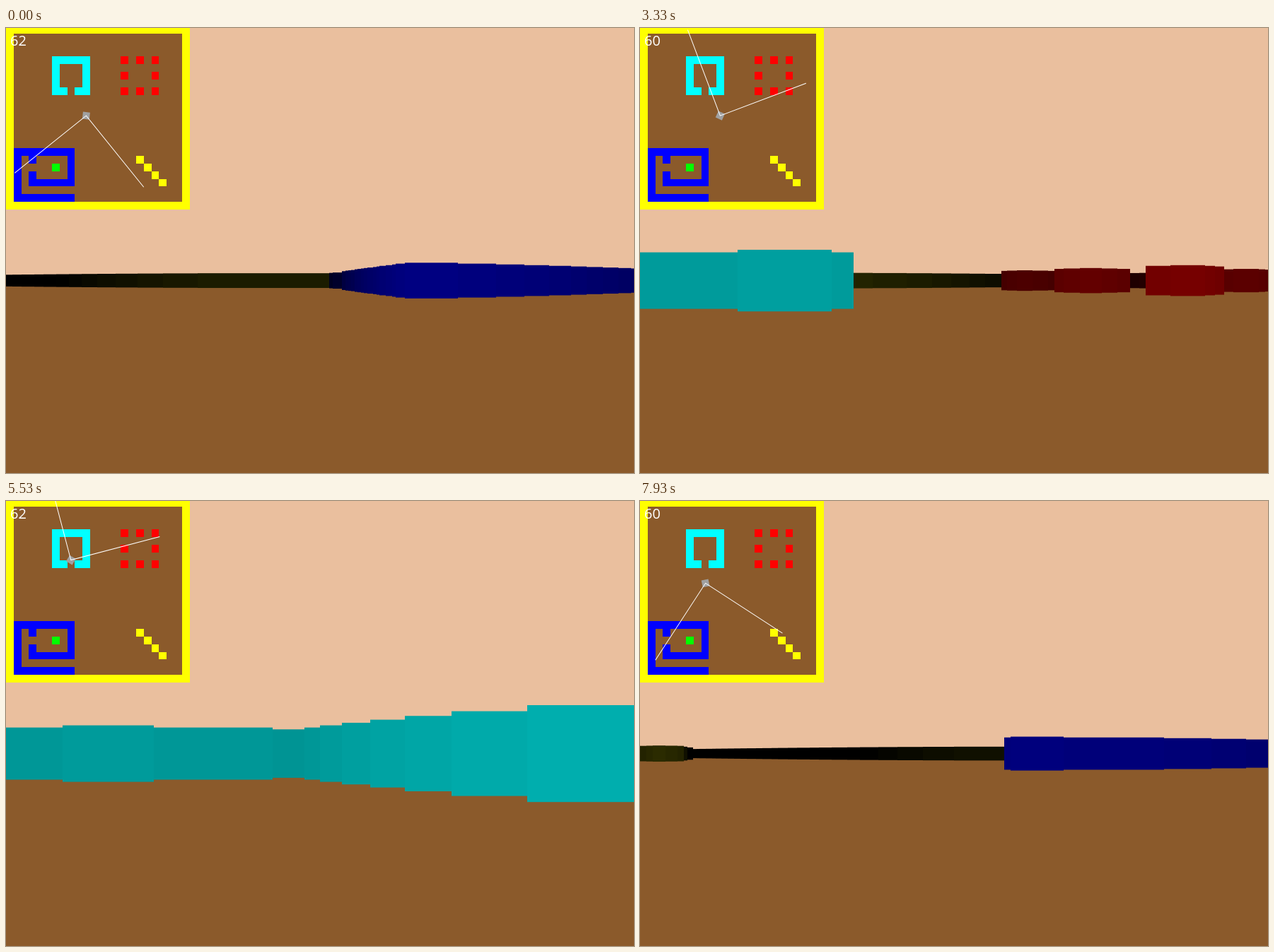
Write an HTML page with a canvas that moves like this. It is 888x630 px and loops after 8 s.

```html
<!DOCTYPE html>
<html lang="en">
<head>
<meta charset="utf-8">
<title>Raycaster</title>
<style>
  html, body { margin: 0; width: 100%; height: 100%; overflow: hidden; background: #8b5a2b; }
  canvas { display: block; }
</style>
</head>
<body>
<canvas id="view" width="888" height="630"></canvas>
<script>
const ctx = document.getElementById('view').getContext('2d');
const W = 888, H = 630, HORIZON = 357.6;
const SKY = '#eabf9e', FLOOR = '#8b5a2b';
const LOOP_MS = 8000, TICKS = 120, TICK_MS = LOOP_MS / TICKS;
const COLUMNS = 200, FOV = 90, STEP = 0.25;
const SIZE = 24, CELL = 10.82, MAP_TOP = -2.8, SIGHT = 12;
const RAD = Math.PI / 180;

// Wall kinds and their colours as red, green, blue switches
const YELLOW = [1, 1, 0], CYAN = [0, 1, 1], RED = [1, 0, 0], BLUE = [0, 0, 1], GREEN = [0, 1, 0];
const grid = Array.from({ length: SIZE }, () => Array(SIZE).fill(null));

function outline(kind, x0, y0, x1, y1) {
  for (let y = y0; y <= y1; y++) {
    for (let x = x0; x <= x1; x++) {
      if (x === x0 || x === x1 || y === y0 || y === y1) grid[y][x] = kind;
    }
  }
}

function buildMap() {
  outline(YELLOW, 0, 0, SIZE - 1, SIZE - 1);
  for (let i = 17; i <= 20; i++) grid[i][i] = YELLOW;

  outline(CYAN, 6, 4, 10, 8);
  grid[8][8] = null;

  for (let y = 4; y <= 8; y += 2) {
    for (let x = 15; x <= 19; x += 2) grid[y][x] = RED;
  }
  grid[6][17] = null;

  outline(BLUE, 1, 16, 8, 22);
  outline(BLUE, 3, 16, 8, 20);
  grid[21][8] = grid[18][3] = null;
  grid[18][6] = GREEN;
}

// The player holds keys over spans of ticks, at constant speeds per tick
const TURN = 7.83, WALK = 0.3;
const START = { x: 10.478, y: 11.73, heading: 96.2 };
const LEFT = [[13, 16], [27.15, 43.83], [49, 55], [60, 63.455], [117.6, 118.93]];
const RIGHT = [[73.78, 101.93]];
const AHEAD = [[61.95, 63.26], [64, 73.41], [77.52, 82.04], [103, 104], [107.3, 116.41]];
const RATE_FLIPS = [20, 28, 40, 58, 88, 102, 110];

function held(spans, tick) {
  return spans.reduce((sum, [a, b]) => sum + Math.max(0, Math.min(b, tick) - a), 0);
}

function headingAt(tick) {
  return START.heading + TURN * (held(RIGHT, tick) - held(LEFT, tick));
}

// Sums the walk along the heading held at each moment
function playerAt(tick) {
  let { x, y } = START;
  const slices = 40;
  for (const [a, b] of AHEAD) {
    const dt = Math.max(0, Math.min(b, tick) - a) / slices;
    for (let i = 0; i < slices && dt; i++) {
      const angle = headingAt(a + (i + 0.5) * dt) * RAD;
      x += Math.cos(angle) * WALK * dt;
      y += Math.sin(angle) * WALK * dt;
    }
  }
  return { x, y, heading: headingAt(tick) };
}

function paint(kind, level) {
  return `rgb(${kind.map(c => Math.round(c * level)).join(',')})`;
}

// Columns meet on whole pixels; heights keep their fractions
function strip(x0, x1, y0, y1, color) {
  const x = Math.round(x0);
  ctx.fillStyle = color;
  ctx.fillRect(x, y0, Math.round(x1) - x, y1 - y0);
}

function box(x0, x1, y0, y1, color) {
  strip(x0, x1, Math.round(y0), Math.round(y1), color);
}

// Counts fixed steps until a wall is met
function cast(px, py, angle) {
  const dx = Math.cos(angle) * STEP, dy = Math.sin(angle) * STEP;
  for (let n = 1; ; n++) {
    const x = Math.floor(px + dx * n), y = Math.floor(py + dy * n);
    const kind = grid[y] ? grid[y][x] : YELLOW;
    if (kind !== null) return { n, kind: kind || YELLOW };
  }
}

function drawScene({ x, y, heading }) {
  box(0, W, 0, HORIZON, SKY);
  box(0, W, HORIZON, H, FLOOR);
  const width = W / COLUMNS;
  for (let i = 0; i < COLUMNS; i++) {
    const angle = heading - FOV / 2 + (i + 0.5) * FOV / COLUMNS;
    const { n, kind } = cast(x, y, angle * RAD);
    const half = 480 / n;
    const level = Math.max(0, 200 - 15 * STEP * n);
    strip(i * width, (i + 1) * width, HORIZON - half, HORIZON + half, paint(kind, level));
  }
}

function drawMap({ x, y, heading }) {
  const size = SIZE * CELL;
  box(0, size, MAP_TOP, MAP_TOP + size, FLOOR);
  grid.forEach((row, j) => row.forEach((kind, i) => {
    const top = MAP_TOP + j * CELL;
    if (kind) box(i * CELL, (i + 1) * CELL, top, top + CELL, paint(kind, 255));
  }));

  ctx.save();
  ctx.translate(x * CELL, y * CELL + MAP_TOP);
  ctx.rotate(heading * RAD);
  ctx.fillStyle = '#a0a0a0';
  ctx.fillRect(-5, -5, 10, 10);

  // Edges of the field of view
  const reach = SIGHT * CELL * Math.SQRT1_2;
  ctx.strokeStyle = '#fff';
  ctx.lineWidth = 1;
  ctx.beginPath();
  ctx.moveTo(reach, -reach);
  ctx.lineTo(0, 0);
  ctx.lineTo(reach, reach);
  ctx.stroke();
  ctx.restore();
}

function drawRate(tick) {
  const flips = RATE_FLIPS.filter(t => t <= tick).length;
  ctx.font = '20px "Open Sans", "Noto Sans", sans-serif';
  ctx.fillStyle = '#fff';
  ctx.fillText(flips % 2 ? '60' : '62', 6, 24.5);
}

function render(ms) {
  const tick = Math.floor((ms % LOOP_MS + 4) / TICK_MS) % TICKS;
  const player = playerAt(tick);
  drawScene(player);
  drawMap(player);
  drawRate(tick);
}

buildMap();
const start = performance.now();
function loop() {
  render(performance.now() - start);
  requestAnimationFrame(loop);
}
loop();
</script>
</body>
</html>
```
